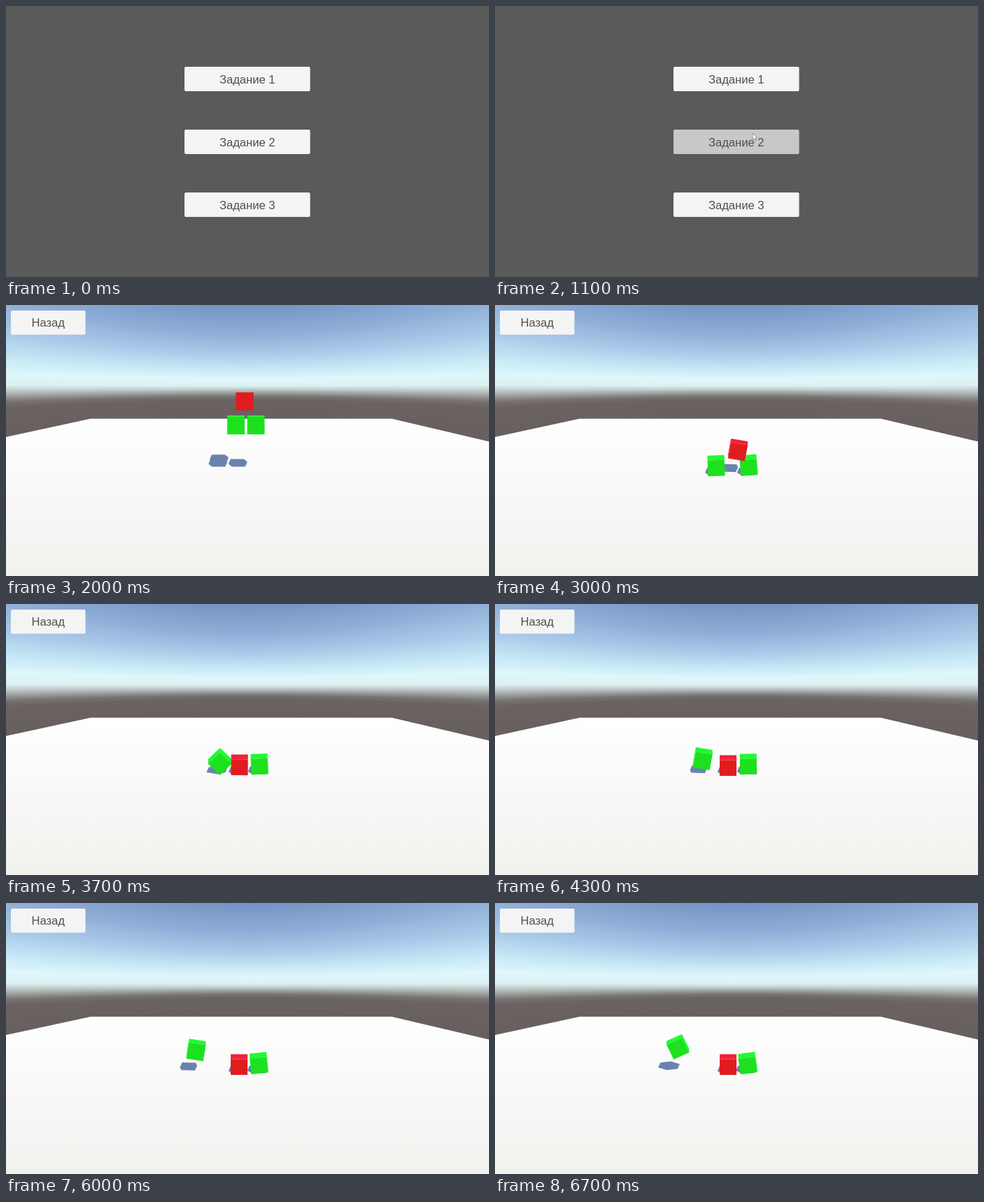
Write an HTML page with a canvas that moves like this. It is 690 px wide and 388 px high and loops after 6.8 s.

```html
<!DOCTYPE html>
<html lang="ru">
<head>
<meta charset="utf-8">
<style>
html, body { margin: 0; width: 100%; height: 100%; overflow: hidden; background: #5a5a5a; }
canvas { display: block; }
</style>
</head>
<body>
<canvas id="stage" width="690" height="388"></canvas>
<script>
const W = 690, H = 388, LOOP = 6800, STEP = 100;
const SCENE = 1200, HIT = 2000, LANDED = 2500, DRIFT = 3000;
const HORIZON = 118, FOCAL = 276, EYE = 135;

const GREEN = { front: '#1de11f', light: '#20fa2f', dark: '#147a1a' };
const RED = { front: '#e11c1f', light: '#f0223a', dark: '#7d3033' };

const stage = document.getElementById('stage');
const ctx = stage.getContext('2d');
const backdrop = makeBackdrop();

const ramp = (t, from, to) => Math.min(1, Math.max(0, (t - from) / (to - from)));
const mix = (a, b, k) => a + (b - a) * k;
const smooth = k => k * k * (3 - 2 * k);
const easeOut = k => 1 - (1 - k) ** 2;

function poly(c, points, fill) {
  c.beginPath();
  points.forEach(([x, y]) => c.lineTo(x, y));
  c.closePath();
  c.fillStyle = fill;
  c.fill();
}

// Sky bands follow equal elevation, so they spread towards the sides
function makeBackdrop() {
  const layer = document.createElement('canvas');
  layer.width = W;
  layer.height = H;
  const c = layer.getContext('2d');
  const bands = [[0, '#7493c3'], [40, '#8dacd6'], [70, '#a9cae8'], [93, '#c8e9f6'], [106, '#def7fa'],
    [116, '#dcf0f1'], [121, '#c0caca'], [126, '#9a9d9d'], [131, '#777270'], [136, '#6a6361'], [170, '#665f5e']];
  for (let x = 0; x < W; x++) {
    const k = Math.hypot(1, (x + 0.5 - W / 2) / FOCAL);
    const sky = c.createLinearGradient(0, HORIZON - HORIZON * k, 0, HORIZON + 52 * k);
    bands.forEach(([y, color]) => sky.addColorStop(y / 170, color));
    c.fillStyle = sky;
    c.fillRect(x, 0, 1, 200);
  }
  const floor = c.createLinearGradient(0, 163, 0, H);
  floor.addColorStop(0, '#ffffff');
  floor.addColorStop(0.2, '#fcfcfc');
  floor.addColorStop(1, '#f1f2ee');
  poly(c, [[121, 162.8], [551, 162.8], [W, 195.6], [W, H], [0, H], [0, 189]], floor);
  return layer;
}

function button(x, y, w, h, label, fill = '#f4f4f4') {
  ctx.beginPath();
  ctx.roundRect(x, y, w, h, 2);
  ctx.fillStyle = fill;
  ctx.fill();
  ctx.font = '16.6px "Liberation Sans", Arial, sans-serif';
  ctx.textAlign = 'center';
  ctx.fillStyle = '#505050';
  ctx.fillText(label, x + w / 2, y + h / 2 + 6);
}

function cursor(t) {
  if (t < 600 || t >= 1700) return;
  const enter = 1 - easeOut(ramp(t, 600, 900)), leave = ramp(t, 1200, 1700);
  const x = 368 + 192 * enter + 330 * leave, y = 182 + 198 * enter + 80 * leave;
  const arrow = [[0, 0], [0, 9.5], [2.2, 7.6], [3.8, 11], [5.3, 10.3], [3.8, 7], [6.5, 7]];
  poly(ctx, arrow.map(([a, b]) => [x + a, y + b]), '#fff');
  ctx.strokeStyle = '#777';
  ctx.lineWidth = 0.8;
  ctx.stroke();
}

function menu(t) {
  ctx.fillStyle = '#5a5a5a';
  ctx.fillRect(0, 0, W, H);
  for (let i = 0; i < 3; i++) {
    const pressed = i === 1 && t >= 1000;
    button(255, 87 + i * 90, 179.5, 35, 'Задание ' + (i + 1), pressed ? '#c8c8c8' : '#f4f4f4');
  }
}

// The shadow of a box is the outline swept by its three projected edges
function shadow({ x, y, angle }) {
  const d = y - 27, r = angle * Math.PI / 180, c = Math.cos(r), s = Math.sin(r);
  const size = mix(0.75, 1, ramp(y, 27, 138));
  const cx = x - 57 + 0.09 * d + 0.00085 * d * d;
  const cy = 205 + 0.1 * d + 0.0003 * d * d;
  const edges = [[19 * c + 5 * s, 4 * s], [5 * c - 19 * s, 4 * c], [-3, 7]]
    .map(([a, b]) => b < 0 ? [-a * size, -b * size] : [a * size, b * size])
    .sort((p, q) => Math.atan2(p[1], p[0]) - Math.atan2(q[1], q[0]));
  let px = cx - edges.reduce((sum, e) => sum + e[0], 0) / 2;
  let py = cy - edges.reduce((sum, e) => sum + e[1], 0) / 2;
  const points = [];
  for (const sign of [1, -1]) {
    for (const [a, b] of edges) {
      points.push([px, py]);
      px += sign * a;
      py += sign * b;
    }
  }
  poly(ctx, points, '#6983ae');
}

function cube({ x, y, angle }, color) {
  const w = 27.5 - 0.015 * y, h = 29.7 - 0.03 * y, depth = (EYE - y) * 0.07;
  const r = angle * Math.PI / 180, c = Math.cos(r), s = Math.sin(r);
  const front = [[-.5, -.5], [.5, -.5], [.5, .5], [-.5, .5]]
    .map(([a, b]) => [x + (a * c - b * s) * w, y + (a * s + b * c) * h]);
  front.forEach((p, i) => {
    const q = front[(i + 1) % 4];
    if ((p[0] - q[0]) * depth <= 0) return;
    poly(ctx, [p, q, [q[0], q[1] + depth], [p[0], p[1] + depth]], depth < 0 ? color.light : color.dark);
  });
  poly(ctx, front, color.front);
}

// The pair drops when hit; the left cube then rolls away, the right one rocks
function pair(t) {
  const drop = ramp(t, HIT, LANDED) ** 1.5, n = Math.max(0, t - DRIFT) / 1000;
  return {
    left: {
      x: 328.5 - 12.5 * drop - 14.8 * n,
      y: 173 + 60.5 * drop - 6.8 * n,
      angle: -2 * drop - 63 * n + 2.2 * n * n
    },
    right: {
      x: 357 + 5.4 * drop - 0.35 * n,
      y: 173 + 59.7 * drop,
      angle: -drop * (1 + 3 * Math.abs(n - 1.3))
    }
  };
}

// Falls freely, lands on the pair, then slips down between them
function striker(t) {
  const fall = ramp(t, SCENE, HIT) ** 2;
  const settle = easeOut(ramp(t, HIT, DRIFT)), slip = smooth(ramp(t, DRIFT, 3800));
  return {
    x: 341 + 6 * settle - 14 * slip,
    y: 27.5 + 110.5 * fall + 72 * settle + 24.8 * slip,
    angle: 10 * (settle - slip)
  };
}

function scene(t) {
  ctx.drawImage(backdrop, 0, 0);
  const { left, right } = pair(t), red = striker(t);
  [red, left, right].forEach(shadow);
  cube(left, GREEN);
  cube(right, GREEN);
  cube(red, RED);
  button(7, 8, 106.5, 34.5, 'Назад');
}

function draw(now) {
  const t = Math.floor((now % LOOP) / STEP) * STEP;
  if (t < SCENE) menu(t);
  else scene(t);
  cursor(t);
}

const start = performance.now();
function tick() {
  draw(performance.now() - start);
  requestAnimationFrame(tick);
}
tick();
</script>
</body>
</html>
```
